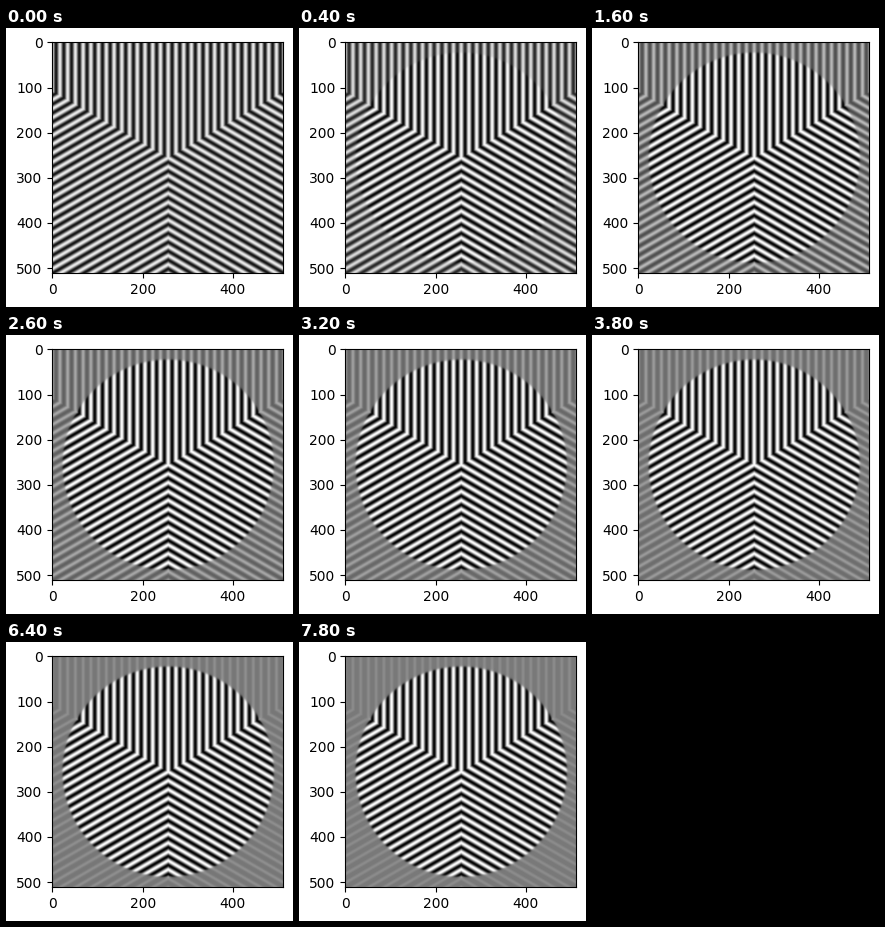
These frames come from a looping animation (287 px wide and 279 px high, 8000 ms). A matplotlib script:

```python
import numpy as np
import matplotlib.pyplot as plt
from matplotlib.animation import FuncAnimation

W, H, DPI = 287, 279, 100
LEFT, TOP, SIDE = 46.2, 14.2, 231
N = 512
FRAMES = 40
PERIOD = N / 30
RADIUS = 233

yy, xx = np.mgrid[0:N, 0:N]
x, y = xx - N / 2, yy - N / 2

# Three 120 degree sectors, each striped along its own axis.
angle = np.arctan2(-y, x)
sector = np.round((angle - np.pi / 2) / (2 * np.pi / 3))
turn = sector * 2 * np.pi / 3
across = x * np.cos(turn) - y * np.sin(turn)
phase = 2 * np.pi * across / PERIOD
stripes = np.cos(phase)
fine = np.cos(2 * phase)
disc = 1 / (1 + np.exp((np.hypot(x, y) - RADIUS) / 1.2))


def picture(n):
    """Stripes that fade towards grey outside the disc."""
    inner = 1 - 0.15 * np.exp(-n / 1.5)
    outer = 0.06 + 0.79 * np.exp(-n / 10)
    ripple = 0.06 * (1 - np.exp(-n / 6)) * np.exp(-n / 40)
    outside = outer * stripes + ripple * fine
    return disc * inner * stripes + (1 - disc) * outside


fig = plt.figure(figsize=(W / DPI, H / DPI), dpi=DPI)
ax = fig.add_axes([LEFT / W, 1 - (TOP + SIDE) / H, SIDE / W, SIDE / H])
img = ax.imshow(picture(0), cmap="gray", vmin=-1, vmax=1)


def update(n):
    img.set_data(picture(n))
    return [img]


anim = FuncAnimation(fig, update, frames=FRAMES, interval=200,
                     repeat=True, repeat_delay=0)
plt.show()
```
